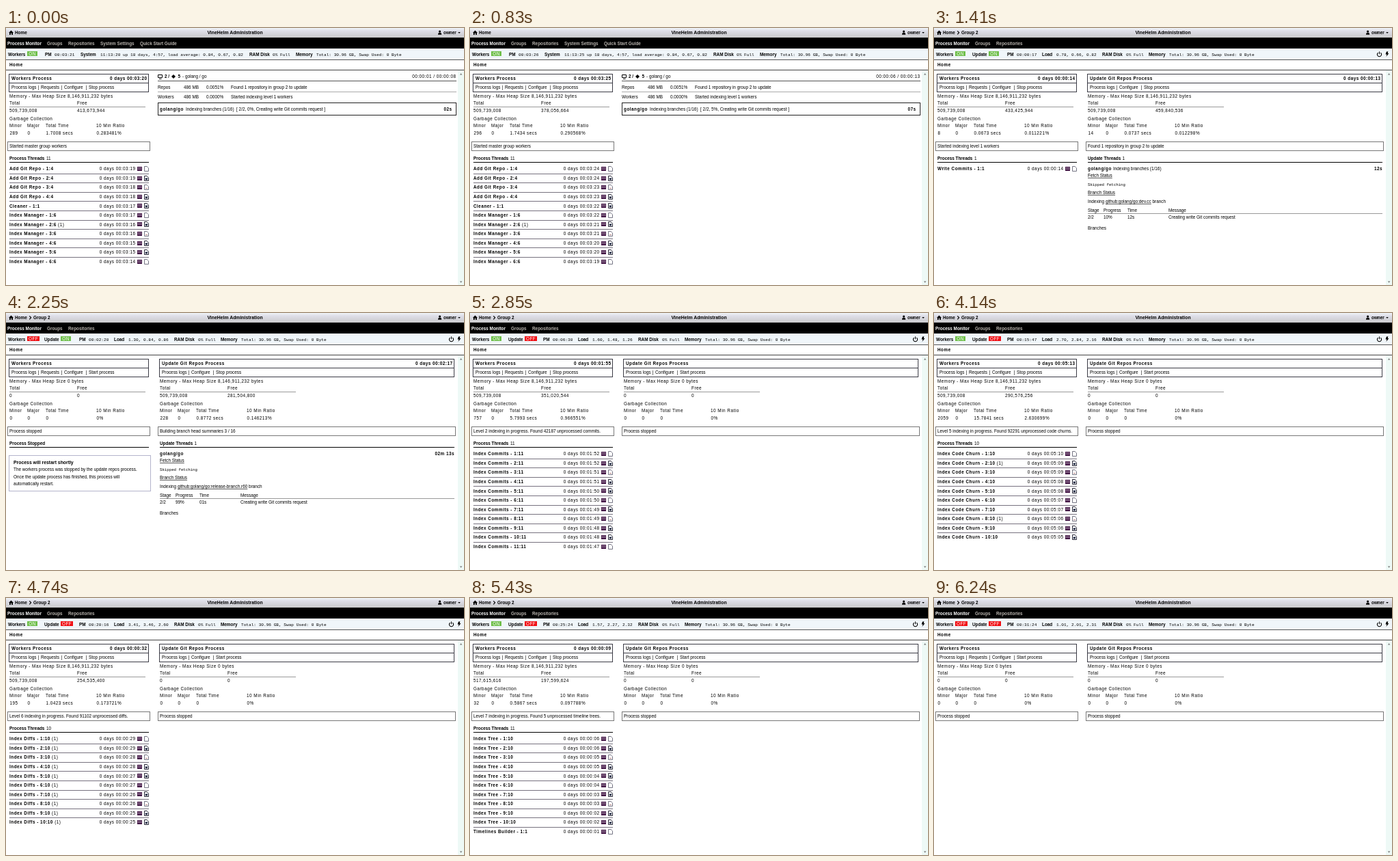
Recreate the animation shown at these times as an HTML page. Size 670 by 376 pixels, loop 6.27 s.

```html
<!DOCTYPE html>
<html lang="en">
<head>
<meta charset="utf-8">
<title>Process monitor</title>
<style>
html, body { margin: 0; width: 100%; height: 100%; overflow: hidden; background: #fff; }
svg { display: block; width: 670px; height: 376px; }
text { font: 6.38px "Liberation Sans", Arial, sans-serif; fill: #000; white-space: pre; }
.b { font-weight: bold; }
.s { letter-spacing: .49px; }
.big { font-size: 6.87px; }
.m { font: 6.12px "Liberation Mono", "Courier New", monospace; }
.log { font-size: 5.73px; }
.w { fill: #fff; }
.g { fill: #b9b4ae; }
.u { text-decoration: underline; }
</style>
</head>
<body>
<svg id="stage" viewBox="0 0 670 376"></svg>
<script>
const LOOP = 6270, HOLD = 190, STEP = 30, GROUP_AT = 1010;

// time in ms, monitor uptime in s, load averages
const KNOTS = [
  [190, 7, .78, .66, .82], [1410, 17, .78, .66, .82], [2250, 140, 1.30, .84, .86],
  [3480, 653, 1.92, 2.15, 1.67], [4740, 1216, 3.41, 3.46, 2.60],
  [5430, 1524, 1.57, 2.27, 2.32], [6240, 1884, 1.01, 2.01, 2.31], [6300, 1910, 1.01, 2.01, 2.31]
];

const HEAP = 509739008;
const STOP = 120, UPDATE_END = 262, FINISH = 1777;
const numbered = (name, n) => Array.from({ length: n }, (_, i) => `${name} - ${i + 1}:${n}`);
const found = (level, what) => `Level ${level} indexing in progress. Found ${what}.`;

// at: start on the uptime clock; stats: [seconds, free heap, minor collections, ratio]
const MAIN = {
  lag: 1, tags: [6], stats: [200, 413673944, 289, .283481], msg: 'Started master group workers',
  threads: [...numbered('Add Git Repo', 4), 'Cleaner - 1:1', ...numbered('Index Manager', 6)]
};
const heavy = [19, 224872320, 125, .159691];
const LEVELS = [
  { at: 3, lag: 0, stats: [14, 433425944, 8, .011221], threads: ['Write Commits - 1:1'],
    msg: 'Started indexing level 1 workers' },
  { at: 275, lag: 3, stats: heavy, threads: numbered('Index Commits', 11), msg: found(2, '42187 unprocessed commits') },
  { at: 400, lag: 3, stats: heavy, threads: numbered('Index Commits', 11), msg: found(3, '42187 unprocessed commits') },
  { at: 520, lag: 3, stats: heavy, threads: numbered('Index Changes', 11), msg: found(4, '92291 unprocessed changes') },
  { at: 634, lag: 3.5, tags: [1, 7], stats: heavy, threads: numbered('Index Code Churn', 10),
    msg: found(5, '92291 unprocessed code churns') },
  { at: 1184, lag: 3, tags: [0, 1, 2, 3, 4, 5, 6, 7, 8, 9], stats: [32, 254535400, 195, .173721],
    threads: numbered('Index Diffs', 10), msg: found(6, '91102 unprocessed diffs') },
  { at: 1515, lag: 3, stats: [9, 197599624, 32, .097788], total: 517615616,
    threads: [...numbered('Index Tree', 10), 'Timelines Builder - 1:1'], msg: found(7, '5 unprocessed timeline trees') }
];
const BRANCHES = ['dev.cc', 'dev.garbage', 'dev.power64', 'dev.ssa', 'master',
  ...[1, 2, 3, 4, 5, 6, 7].map(n => 'release-branch.go1.' + n),
  ...[57, 58, 59, 60].map(n => 'release-branch.r' + n)];

const pad = n => String(Math.floor(n)).padStart(2, '0');
const hms = s => [s / 3600, s / 60 % 60, s % 60].map(pad).join(':');
const days = s => '0 days ' + hms(s);
const short = s => (s < 60 ? '' : pad(s / 60) + 'm ') + pad(s % 60) + 's';
const comma = n => n.toLocaleString('en-US');

let out;
const text = (x, y, str, cls = '', anchor = 'start') =>
  out += `<text x="${x}" y="${y + 2.3}" class="${cls}" text-anchor="${anchor}">${str}</text>`;
const fill = (x, y, w, h, color) => out += `<rect x="${x}" y="${y}" width="${w}" height="${h}" fill="${color}"/>`;
const line = (x1, x2, y, color) => fill(x1, Math.floor(y), x2 - x1, 1, color);
const frameBox = (x, y, w, h, color) =>
  out += `<rect x="${x + .5}" y="${y + .5}" width="${w - 1}" height="${h - 1}" fill="#fff" stroke="${color}"/>`;
const path = (d, color, stroke = 'none', w = 1) =>
  out += `<path d="${d}" fill="${color}" stroke="${stroke}" stroke-width="${w}"/>`;

function clock(t) {
  t = Math.max(t, HOLD);
  const i = KNOTS.findIndex(k => t < k[0]), a = KNOTS[i - 1], b = KNOTS[i];
  const p = (t - a[0]) / (b[0] - a[0]);
  const [, up, ...load] = a.map((v, j) => v + (b[j] - v) * p);
  return { up: Math.floor(up + 1e-6), load: load.map(v => v.toFixed(2)).join(', ') };
}

// Heap use as a sawtooth, collections growing with run time
function usage(s, [s0, free, minor, ratio], total = HEAP) {
  const low = 19e7, span = 27e7;
  const drop = (free - low - (s - s0) * 7123456) % span;
  return { s, total, free: low + (drop + span) % span,
    minor: Math.round(minor * s / s0), ratio: ratio * s / s0 };
}

function badge(x, on) {
  fill(x, 34, on ? 15 : 18, 7, on ? '#6fbf4b' : '#f00d12');
  text(x + (on ? 7.6 : 9.1), 37.7, on ? 'ON' : 'OFF', 'w s', 'middle');
}

function header(group) {
  fill(0, 0, 670, 14, 'url(#bar)');
  path('M4 6.9L7.5 3.6L11 6.9H10V10H8.2V7.6H6.8V10H5V6.9Z', '#000');
  text(13, 6.8, 'Home', 'b');
  if (group) {
    path('M34.3 4.3L36.6 6.8L34.3 9.3', 'none', '#000', 1.2);
    text(40, 6.8, 'Group 2', 'b');
  }
  text(335, 6.6, 'VineHelm Administration', 'b big', 'middle');
  path('M633 5a1.6 1.6 0 1 1 3.2 0a1.6 1.6 0 1 1-3.2 0M632 9.8Q632 6.6 634.6 6.8Q637.2 6.6 637.2 9.8Z', '#000');
  text(640, 6.8, 'owner', 'b');
  path('M661.2 6h3.6l-1.8 2Z', '#000');

  fill(0, 14, 670, 16, '#000');
  text(2, 22.3, 'Process Monitor', 'b w');
  const nav = [[60, 'Groups'], [91, 'Repositories'], [138, 'System Settings'], [196, 'Quick Start Guide']];
  nav.slice(0, group ? 2 : 4).forEach(([x, s]) => text(x, 22.3, s, 'b g'));

  fill(0, 30, 670, 16, '#f0f6fa');
  line(0, 670, 46, '#555');
  text(5, 53.6, 'Home', 'b s');
  line(0, 670, 61, '#444');
  fill(661, 62, 9, 314, '#eef9f6');
  path('M663.8 68.5h3.6l-1.8-2.2ZM663.8 370.5h3.6l-1.8 2.2Z', '#777');
}

function stats(items) {
  for (const [x, label, vx, value] of items) {
    text(x, 38.3, label, 'b');
    text(vx, 38.6, value, 'm');
  }
}

function panel(x, right, title, run, links, msg) {
  const u = run || { total: 0, free: 0, minor: 0 };
  frameBox(x + 4, 67, right - x - 4, 27, '#3c3c46');
  line(x + 5, right, 80, '#3c3c46');
  text(x + 8, 73.8, title, 'b s');
  if (run) text(right - 2.5, 73.8, days(run.s), 'b s', 'end');
  const all = [...links, (run ? 'Stop' : 'Start') + ' process'];
  const xs = links.length > 2 ? [8, 51, 85, 121] : [8, 51, 87];
  all.forEach((s, i) => {
    text(x + xs[i], 87, s);
    if (i) text(x + xs[i] - 4.6, 86.8, '|');
  });

  text(x + 5, 100, `Memory - Max Heap Size ${run ? '8,146,911,232' : 0} bytes`, 's');
  text(x + 5, 110, 'Total', 's');
  text(x + 104, 110, 'Free', 's');
  line(x + 5, x + 204, 115, '#999');
  text(x + 5, 120.6, comma(u.total), 's');
  text(x + 104, 120.6, comma(u.free), 's');

  text(x + 5, 132.8, 'Garbage Collection', 's');
  const secs = run ? (Math.floor(u.ratio * 6e4) / 1e4).toFixed(4) + ' secs' : 0;
  const cols = [[5, 'Minor', u.minor], [31, 'Major', 0], [58, 'Total Time', secs],
    [132, '10 Min Ratio', run ? u.ratio.toFixed(6) + '%' : '0%']];
  for (const [dx, name, value] of cols) {
    text(x + dx, 142.8, name, 's');
    text(x + dx + .4, 153.8, value, 's');
  }

  frameBox(x + 2, 166, right - x, 14, '#777');
  text(x + 5, 172.8, msg);
}

function heading(x, right, title, count = '') {
  text(x, 190.8, title, 'b');
  text(x + 54 - (x > 200 ? 3.5 : 0), 190.8, count);
  line(x, right, 196, '#000');
}

function gridIcon(y) {
  fill(192, y - 3, 7, 6, '#3d0f40');
  for (const dy of [-1.5, .5]) path(`M193 ${y + dy}h1m1 0h1m1 0h1`, 'none', '#fff');
}

function docIcon(y, i) {
  const kind = i % 5, plain = kind === 0 || kind === 2;
  path(`M202.5 ${y - 3.5}h3.6l2.4 2.4v4.6h-6Z`, '#fff', plain ? '#667' : '#112', .9);
  if (!plain) path(`M203.8 ${y + 2.2}v-2.6h1.4v1l1.8-1.8v3.4Z`, '#14203c');
  else if (kind === 2) line(204, 207, y + 1, '#b88');
}

function threads(level, s) {
  heading(5, 209, 'Process Threads', level.threads.length);
  level.threads.forEach((name, i) => {
    const age = s - Math.floor(level.lag + i / 2), y = 206 + i * 13.57, iconY = Math.round(y);
    if (age < 0) return;
    const tag = (level.tags || []).includes(i) ? ' <tspan font-weight="normal">(1)</tspan>' : '';
    if (i) line(5, 209, y - 6.3, '#77727f');
    text(5, y, name + tag, 'b s');
    text(189.5, y, days(age), 's', 'end');
    gridIcon(iconY);
    docIcon(iconY, i);
  });
}

function restartNote() {
  heading(5, 209, 'Process Stopped');
  frameBox(4, 208, 208, 53, '#b4b4cc');
  text(11, 218.2, 'Process will restart shortly', 'b big');
  ['The workers process was stopped by the update repos process.',
    'Once the update process has finished, this process will',
    'automatically restart.'].forEach((s, i) => text(11, 229 + i * 10.4, s));
}

function updateThread(up) {
  const busy = up < STOP, s = up - (up < 60 ? 5 : 7);
  const n = Math.min(16, 1 + Math.max(0, Math.floor((up - 72) / 3)));
  heading(225, 656, 'Update Threads', 1);
  text(225, 206, 'golang/go', 'b s');
  if (busy) text(262, 206, `Indexing branches (${n}/16)`);
  text(656, 206, short(s), 'b s', 'end');
  text(225, 216, 'Fetch Status', 'u');
  text(225, 229, 'Skipped fetching', 'm log');
  text(225, 241, 'Branch Status', 'u');
  text(225, 253.8, `Indexing <tspan class="u">github:golang/go:${BRANCHES[n - 1]}</tspan> branch`);
  const first = n < 2;
  const cols = [[225, 'Stage', '2/2'], [248, 'Progress', (first ? Math.max(0, s - 2) : 99) + '%'],
    [283, 'Time', first ? short(s) : '01s'], [343, 'Message', 'Creating write Git commits request']];
  for (const [x, name, value] of cols) {
    text(x, 266.3, name);
    text(x, 277, value);
  }
  line(225, 656, 271, '#999');
  text(225, 293, 'Branches');
}

function groupPage(t) {
  const { up, load } = clock(t);
  const on = up < STOP || (up >= LEVELS[1].at && up < FINISH), updating = up < UPDATE_END;
  text(3, 38.3, 'Workers', 'b');
  badge(31, on);
  text(56, 38.3, 'Update', 'b');
  badge(80, updating);
  stats([[107, 'PM', 121, hms(up)], [158, 'Load', 179, load], [246, 'RAM Disk', 281, '0% Full'],
    [314, 'Memory', 344, 'Total: 30.96 GB, Swap Used: 0 Byte']]);
  path('M649.6 36.2a3.1 3.1 0 1 0 3.8 0M651.5 34.6v3.6', 'none', '#000', 1.1);
  path('M662 34.5h2.4l-.8 2.4h1.8l-3.9 5.2l.9-3.7h-1.9Z', '#000');

  const level = LEVELS.filter(l => l.at <= up).pop();
  const run = on && usage(up - level.at, level.stats, level.total);
  panel(0, 209, 'Workers Process', run, ['Process logs', 'Requests', 'Configure'], on ? level.msg : 'Process stopped');
  if (on) threads(level, run.s);
  else if (up < FINISH) restartNote();

  const s = up - (up < 60 ? 4 : 3);
  const heap = up < 60 ? [13, 459840536, 14, .012298] : [137, 281504800, 228, .146213];
  const msg = !updating ? 'Process stopped' : up < STOP + 2 ? 'Found 1 repository in group 2 to update'
    : `Building branch head summaries ${Math.min(16, 1 + Math.floor((up - 122) / 9))} / 16`;
  panel(220, 656, 'Update Git Repos Process', updating && usage(s, heap), ['Process logs', 'Configure'], msg);
  if (updating) updateThread(up);
}

function mainPage(t) {
  const e = clock(t).up - 7, s = 200 + e;
  text(3, 38.3, 'Workers', 'b');
  badge(31, true);
  stats([[57, 'PM', 71, hms(s + 1)],
    [109, 'System', 138, hms(40400 + e) + ' up 18 days, 4:57, load average: 0.84, 0.67, 0.82'],
    [356, 'RAM Disk', 390, '0% Full'], [424, 'Memory', 454, 'Total: 30.96 GB, Swap Used: 0 Byte']]);
  panel(0, 209, 'Workers Process', usage(s, MAIN.stats), ['Process logs', 'Requests', 'Configure'], MAIN.msg);
  threads(MAIN, s);

  path('M222.5 68.5h6v4h-6ZM224 74.5h3.6', 'none', '#000', 1);
  text(232, 71, '2 /', 'b');
  path('M245 68l3 3l-3 3l-3-3Z', '#000');
  text(251.5, 71, '5', 'b');
  text(258, 71, '- golang / go');
  text(658.5, 71, `${hms(1 + e)} / ${hms(8 + e)}`, 's', 'end');
  line(222, 659, 77, '#555');
  const rows = [['Repos', '0.0051%', 'Found 1 repository in group 2 to update'],
    ['Workers', '0.0000%', 'Started indexing level 1 workers']];
  rows.forEach(([name, share, msg], i) => {
    const y = 87 + i * 13.3;
    text(222, y, name);
    text(260, y, '486 MB');
    text(293, y, share);
    text(329, y, msg);
  });
  line(222, 659, 93, '#aaa');
  frameBox(222, 109, 437, 19, '#222');
  text(225, 118.4, 'golang/go', 'b s');
  text(263, 118.4, `Indexing branches (1/16)  [ 2/2, ${e}%, Creating write Git commits request ]`);
  text(652.5, 118.4, short(2 + e), 'b s', 'end');
}

const stage = document.getElementById('stage');
const defs = '<defs><linearGradient id="bar" x2="0" y2="1"><stop stop-color="#f0f4f8"/>' +
  '<stop offset=".3" stop-color="#dedee8"/><stop offset="1" stop-color="#cacacc"/></linearGradient></defs>';

function draw() {
  const t = performance.now() % LOOP, group = t >= GROUP_AT;
  out = defs;
  header(group);
  (group ? groupPage : mainPage)(Math.floor((t + 1) / STEP) * STEP);
  stage.innerHTML = out;
  requestAnimationFrame(draw);
}
draw();
</script>
</body>
</html>
```
